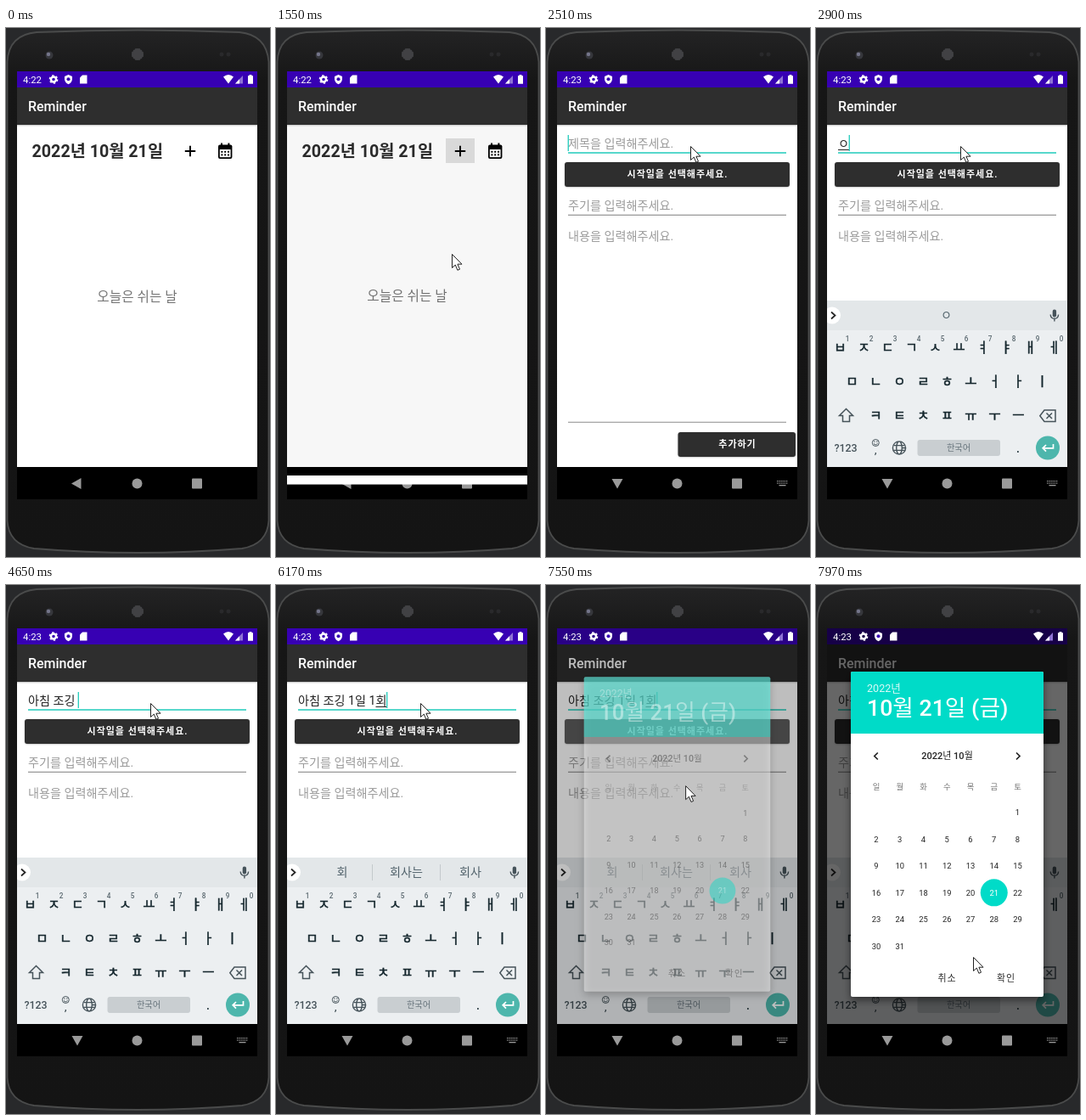
Animation of 311x623 px, one loop 8000 ms. Source, as an HTML page with a canvas:

```html
<!DOCTYPE html>
<html lang="ko">
<head>
<meta charset="utf-8">
<title>Reminder</title>
<style>
html, body { margin: 0; width: 100%; height: 100%; overflow: hidden; background: #28292b; }
canvas { display: block; width: 311px; height: 623px; }
</style>
</head>
<body>
<canvas id="stage"></canvas>
<script>
const W = 311, H = 623, LOOP = 8000;
const DARK = '#2e2e2e', TEAL = '#1fcbbb', ACCENT = '#00dbc8', KEY = '#14262d', ICON = '#46535a';
const FONT = 'Roboto, "Noto Sans CJK KR", "Noto Sans CJK", sans-serif';
const canvas = document.getElementById('stage');
const c = canvas.getContext('2d');
const ratio = window.devicePixelRatio || 1;
canvas.width = W * ratio;
canvas.height = H * ratio;

const progress = (t, from, to) => Math.min(1, Math.max(0, (t - from) / (to - from)));
const smooth = x => x * x * (3 - 2 * x);
const lerp = (a, b, p) => a + (b - a) * p;

// Last entry of a time-sorted list that has started
const current = (list, t) => list.filter(item => item[0] <= t).pop();

function layer(draw) {
  c.save();
  draw();
  c.restore();
}
function rect(x, y, w, h, color, r = 0) {
  c.fillStyle = color;
  c.beginPath();
  c.roundRect(x, y, w, h, r);
  c.fill();
}
function circle(x, y, r, color) {
  c.fillStyle = color;
  c.beginPath();
  c.arc(x, y, r, 0, 7);
  c.fill();
}
function shape(d, color) {
  c.fillStyle = color;
  c.fill(new Path2D(d));
}
function line(d, color, width = 1.5) {
  c.strokeStyle = color;
  c.lineWidth = width;
  c.stroke(new Path2D(d));
}
function clipRect(x, y, w, h) {
  c.beginPath();
  c.rect(x, y, w, h);
  c.clip();
}
function text(str, x, y, size, color, { weight = 400, align = 'left', spacing = 0, heft = 0 } = {}) {
  c.font = `${weight} ${size}px ${FONT}`;
  c.textAlign = align;
  c.letterSpacing = spacing + 'px';
  c.fillStyle = c.strokeStyle = color;
  c.fillText(str, x, y);
  c.lineWidth = heft;
  if (heft) c.strokeText(str, x, y);
}
const centered = (str, x, y, size, color, style) =>
  text(str, x, y, size, color, { align: 'center', ...style });
function textWidth(str, size) {
  c.font = `400 ${size}px ${FONT}`;
  c.letterSpacing = '0px';
  return c.measureText(str).width;
}

function drawPhone() {
  rect(0, 0, W, H, '#28292b');
  const fill = c.createLinearGradient(0, 0, 0, H);
  fill.addColorStop(0, '#242425');
  fill.addColorStop(0.1, '#161616');
  fill.addColorStop(1, '#141414');
  const body = 'M1.5 40Q3 8 36 5Q155 0 275 5Q307 8 309.5 40V580Q308 608 278 613Q155 623 33 613Q3 608 1.5 580Z';
  shape(body, fill);
  line(body, '#4a4b4b', 1.8);
  circle(51, 32, 4.5, '#36373c');
  circle(50, 31, 2.2, '#74758a');
  circle(155, 31, 7, '#303133');
  for (let y = -6; y <= 6; y += 2)
    for (let x = -6; x <= 6; x += 2)
      if (x * x + y * y < 42) rect(154.5 + x, 30.5 + y, 1, 1, '#747678');
  circle(254, 31, 2.5, '#29292b');
  circle(262, 31, 2.5, '#29292b');
}

function drawStatus(t) {
  const white = '#fff';
  text(t < 2100 ? '4:22' : '4:23', 20, 65, 11.4, white);
  layer(() => {
    c.strokeStyle = white;
    c.lineWidth = 2.4;
    c.beginPath();
    c.arc(56, 60.5, 3, 0, 7);
    c.stroke();
    c.lineWidth = 1.5;
    c.setLineDash([2.4, 2.4]);
    c.beginPath();
    c.arc(56, 60.5, 4.6, 0, 7);
    c.stroke();
  });
  shape('M73.5 55L78 57V60.5Q77.5 64.5 73.5 66.2Q69.5 64.5 69 60.5V57Z', white);
  circle(73.5, 60.3, 2, '#3700b3');
  shape('M90 55.5H95.5V65.5H87V58.5Z', white);
  shape('M256 57.5Q262 52.5 268 57.5L262 65.5Z', white);
  shape('M270 65.5L279 56V65.5Z', '#8f73d4');
  shape('M270 65.5L275 60.2V65.5Z', white);
  shape('M285 56.3H286.6V55H289.4V56.3H291V65.8H285Z', white);
}

function drawNav(typing) {
  const gray = '#9a9a9a';
  rect(13, 517, 283, 38, '#000');
  shape(typing ? 'M77.5 531H90.5L84 542.5Z' : 'M77 536.5L88.5 530V543Z', gray);
  circle(154.5, 536.5, 6, gray);
  rect(219, 530.5, 12, 12, gray, 1);
  if (!typing) return;
  for (let i = 0; i < 6; i++) {
    rect(272 + i * 2.2, 533, 1.3, 1.3, gray);
    rect(272 + i * 2.2, 535.5, 1.3, 1.3, gray);
  }
  rect(274.5, 538, 8, 1.3, gray);
}

function drawWindow() {
  rect(13, 51, 283, 466, '#fff');
  rect(13, 51, 283, 19, '#3700b3');
  rect(13, 70, 283, 44, DARK);
  rect(13, 114, 283, 1, '#d2d2d2');
  rect(13, 115, 283, 1, '#efefef');
  text('Reminder', 26, 98, 16, '#fff', { weight: 500 });
}

function drawHome(t) {
  drawWindow();
  text('2022년 10월 21일', 30.5, 152, 19.7, '#2b2b2b', { weight: 700 });
  const grow = smooth(progress(t, 960, 1300));
  if (grow > 0) layer(() => {
    clipRect(200, 130, 34, 29);
    circle(lerp(220, 217, grow), 145, lerp(8, 24, grow), '#e0e0e0');
  });
  line('M210.8 145H223.2M217 138.8V151.2', '#000', 2);
  rect(250, 137.5, 16.4, 16.5, '#000', 2);
  rect(253, 135.5, 2, 3, '#000');
  rect(261.4, 135.5, 2, 3, '#000');
  rect(251.8, 143, 12.8, 9.2, '#fff');
  for (let i = 0; i < 6; i++)
    rect(253.4 + (i % 3) * 3.8, 144.8 + (i > 2) * 3.6, 2, 2, '#000');
  centered('오늘은 쉬는 날', 154.5, 321.5, 15.7, '#757575');
}

function drawButton(x, y, w) {
  layer(() => {
    c.shadowColor = 'rgba(0,0,0,.3)';
    c.shadowBlur = 1.5;
    c.shadowOffsetY = 0.5;
    rect(x, y, w, 29, DARK, 3);
  });
}
const buttonLabel = (str, x, y) => centered(str, x, y, 11, '#fff', { weight: 700, spacing: 0.98 });

// [time, text, start of the composed part, other suggestions]
const typed = [
  [0, '', 0],
  [2840, 'ㅇ', 0],
  [3380, '아', 0, '아니,아이디어'],
  [3490, '앛', 0, '아침,아침에는'],
  [3600, '아치', 0, '아침,아침에는'],
  [3710, '아침', 0, '아침에,아침에는'],
  [3980, '아침 ', 3],
  [4060, '아침 ㅈ', 3],
  [4140, '아침 조', 3, '조금,조금이라'],
  [4220, '아침 족', 3, '조금,조금이라'],
  [4310, '아침 조기', 3, '조기에,조기축구'],
  [4390, '아침 조깅', 3, '조깅을,조깅하기'],
  [4650, '아침 조깅 ', 6],
  [5310, '아침 조깅 1', 7],
  [5410, '아침 조깅 1ㅇ', 7],
  [5510, '아침 조깅 1이', 7, '이거는,이거'],
  [5610, '아침 조깅 1일', 7, '일단은,일단'],
  [5710, '아침 조깅 1일 1', 10],
  [5910, '아침 조깅 1일 1ㅎ', 10],
  [5980, '아침 조깅 1일 1호', 10, '호텔은,호텔'],
  [6170, '아침 조깅 1일 1회', 10, '회사는,회사']
];
const FOCUS = 2400;

function drawForm(t) {
  const size = 14.15, hint = '#9b9b9b', focused = t >= FOCUS;
  const [since, value, start] = current(typed, t);
  drawWindow();
  text(value || '제목을 입력해주세요.', 26, 140.5, size, value ? '#222' : hint);
  if (value.length > start) {
    const x = 26 + textWidth(value.slice(0, start), size);
    rect(x, 143, textWidth(value.slice(start), size), 1, '#222');
  }
  rect(26, 146.3, 257, focused ? 1.5 : 1, focused ? TEAL : '#7d7d7d');
  const blink = Math.floor((t - Math.max(since, FOCUS)) / 500) % 2 === 0;
  if (focused && blink) rect(25.6 + textWidth(value, size), 126, 1.3, 19, TEAL);

  drawButton(22, 158, 265);
  const press = progress(t, 7110, 7380), fade = 1 - progress(t, 7430, 7750);
  if (press > 0 && fade > 0) layer(() => {
    c.beginPath();
    c.roundRect(22, 158, 265, 29, 3);
    c.clip();
    c.globalAlpha = 0.36 * fade * Math.min(1, press * 3);
    circle(lerp(160, 154.5, press), 172, lerp(10, 140, smooth(press)), '#fff');
  });
  buttonLabel('시작일을 선택해주세요.', 155, 176.3);
  text('주기를 입력해주세요.', 26, 214, size, hint);
  rect(26, 219.7, 257, 1, '#7d7d7d');
  text('내용을 입력해주세요.', 26, 249.5, size, hint);
  rect(26, 463.7, 257, 1, '#8a8a8a');
  drawButton(155.5, 476, 138.5);
  buttonLabel('추가하기', 225.5, 494.3);
}

function drawSuggestions(t) {
  const [, value, start, others] = current(typed, t);
  const word = value.slice(start);
  const put = (str, x) => centered(str, x, 343, 14.1, '#51626b');
  if (others) {
    [word, ...others.split(',')].forEach((str, i) => put(str, 78 + i * 75.5));
    rect(113, 329, 1, 19, '#c3c9cc');
    rect(193, 329, 1, 19, '#c3c9cc');
  } else if (word && !/\d/.test(word)) put(word, 153.5);
}

function drawKeyboard(t) {
  rect(13, 321, 283, 196, '#eceff1');
  rect(13, 321, 283, 35, '#e3e7e9');
  circle(19, 338.5, 10, '#fff');
  line('M18 334.5L22.5 338.5L18 342.5', '#222', 1.7);
  drawSuggestions(t);
  rect(278.7, 331.5, 4.4, 9, ICON, 2.2);
  line('M276.2 337.5Q276.5 342.3 280.9 342.3Q285.3 342.3 285.6 337.5M280.9 342.3V345.5', ICON, 1.4);

  const row = (keys, x, y) =>
    [...keys].forEach((key, i) => centered(key, x + i * 28, y, 15.6, KEY, { heft: 0.5 }));
  row('ㅂㅈㄷㄱㅅㅛㅕㅑㅐㅔ', 28.3, 382);
  [...'1234567890'].forEach((n, i) => centered(n, 37 + i * 28, 369, 8.2, '#5a686f', { weight: 500 }));
  row('ㅁㄴㅇㄹㅎㅗㅓㅏㅣ', 42.3, 422);
  row('ㅋㅌㅊㅍㅠㅜㅡ', 70.3, 462);
  line('M35.5 448.5L43.5 456.5H39.5V463.5H31.5V456.5H27.5Z', ICON);
  line('M269 450H282V463.5H269L263.8 456.7ZM271.5 453.5L278 460M278 453.5L271.5 460', ICON);

  centered('?123', 35, 499, 12.4, ICON, { weight: 500 });
  layer(() => {
    c.strokeStyle = ICON;
    c.lineWidth = 1;
    c.beginPath();
    c.arc(70.3, 488.5, 4, 0, 7);
    c.stroke();
    c.lineWidth = 1.4;
    c.beginPath();
    c.arc(98, 494.5, 7.6, 0, 7);
    c.ellipse(98, 494.5, 3.3, 7.6, 0, 0, 7);
    c.stroke();
  });
  line('M68 489.5Q70.3 492.5 72.6 489.5', ICON, 1);
  rect(68.3, 486.6, 1.2, 1.2, ICON);
  rect(71.2, 486.6, 1.2, 1.2, ICON);
  centered(',', 70.3, 501, 12, KEY);
  line('M91.5 491.7H104.5M91.5 497.3H104.5', ICON, 1.3);
  rect(119.5, 485, 97.5, 19, '#c9ced1', 3);
  centered('한국어', 168, 498, 10.2, '#65727a');
  centered('.', 238, 500, 14, KEY, { weight: 500 });
  circle(273, 494.5, 14, '#4db6ac');
  line('M279.5 490V494.8H267.5M271 491L267.2 494.8L271 498.6', '#fff', 1.7);
}

function drawDialog() {
  layer(() => {
    c.shadowColor = 'rgba(0,0,0,.5)';
    c.shadowBlur = 10;
    c.shadowOffsetY = 4;
    rect(41, 102, 227, 383, '#fff', 2);
  });
  rect(41, 102, 227, 73, ACCENT, [2, 2, 0, 0]);
  text('2022년', 60, 126, 12.6, 'rgba(255,255,255,.85)');
  text('10월 21일 (금)', 60, 154, 26.7, '#fff', { weight: 500 });
  centered('2022년 10월', 154.5, 205, 11, '#222', { weight: 500 });
  line('M72.8 197.5L68.8 201.5L72.8 205.5M236 197.5L240 201.5L236 205.5', '#222', 1.7);

  const columnX = i => 71 + i * 27.75;
  [...'일월화수목금토'].forEach((day, i) => centered(day, columnX(i), 240.5, 9.4, '#757575'));
  for (let day = 1; day <= 31; day++) {
    const cell = day + 5, x = columnX(cell % 7), y = 268 + Math.floor(cell / 7) * 31.45;
    const selected = day === 21;
    if (selected) circle(x, y, 16, ACCENT);
    centered(day, x, y + 3.3, 9.4, selected ? '#fff' : '#222');
  }
  centered('취소', 154.5, 467, 11, DARK, { spacing: 0.98 });
  centered('확인', 224, 467, 11, DARK, { spacing: 0.98 });
}

// [time, x, y]
const pointerPath = [
  [180, 284, 577], [430, 274, 400], [700, 243, 190], [830, 226, 122], [950, 220, 143],
  [1160, 220, 143], [1400, 210, 240], [1550, 207, 266], [1900, 200, 245], [2310, 170, 139],
  [6650, 170, 139], [6930, 160, 170], [7430, 160, 170], [7900, 176, 427], [7970, 185, 438]
];

function drawPointer(t) {
  const from = current(pointerPath, t);
  if (!from) return;
  const to = pointerPath[pointerPath.indexOf(from) + 1] || from;
  const p = to === from ? 0 : progress(t, from[0], to[0]);
  layer(() => {
    c.translate(lerp(from[1], to[1], p) + 0.5, lerp(from[2], to[2], p) + 0.5);
    const arrow = 'M0 0V16L3.8 12.6L6.4 18.8L9 17.7L6.4 11.7H11.5Z';
    shape(arrow, '#fff');
    line(arrow, '#222', 1);
  });
}

function drawScreen(t) {
  const open = 1 - (1 - smooth(progress(t, 1500, 1960))) ** 1.7;
  if (open < 1) layer(() => {
    clipRect(13, 51, 283, 466);
    c.translate(0, -10 * open ** 2);
    drawHome(t);
    const dim = Math.min(0.1, progress(t, 1480, 1550) * 0.026 + open * 0.07);
    rect(13, 115, 283, 412, `rgba(0,0,0,${dim})`);
  });
  drawNav(t >= 2440);
  if (open > 0) layer(() => {
    const shift = 20.7 * (1 - open ** 2), top = 51 + 483 * (1 - open) + shift;
    clipRect(13, top, 283, 517 + shift - top);
    c.translate(0, shift);
    drawForm(t);
  });
  const slide = progress(t, 2580, 2770);
  if (slide > 0) layer(() => {
    clipRect(13, 115, 283, 402);
    c.globalAlpha = slide;
    c.translate(0, 40 * (1 - slide) ** 2);
    drawKeyboard(t);
  });
  const show = progress(t, 7470, 7660);
  if (show > 0) rect(13, 51, 283, 466, `rgba(0,0,0,${0.6 * show})`);
  drawStatus(t);
  if (show > 0) layer(() => {
    const scale = lerp(0.9, 1, 1 - (1 - show) ** 2);
    c.globalAlpha = show;
    c.translate(154.5, 293.5);
    c.scale(scale, scale);
    c.translate(-154.5, -293.5);
    drawDialog();
  });
}

function frame() {
  const t = performance.now() % LOOP;
  c.setTransform(ratio, 0, 0, ratio, 0, 0);
  drawPhone();
  drawScreen(t);
  drawPointer(t);
  requestAnimationFrame(frame);
}
frame();
</script>
</body>
</html>
```
